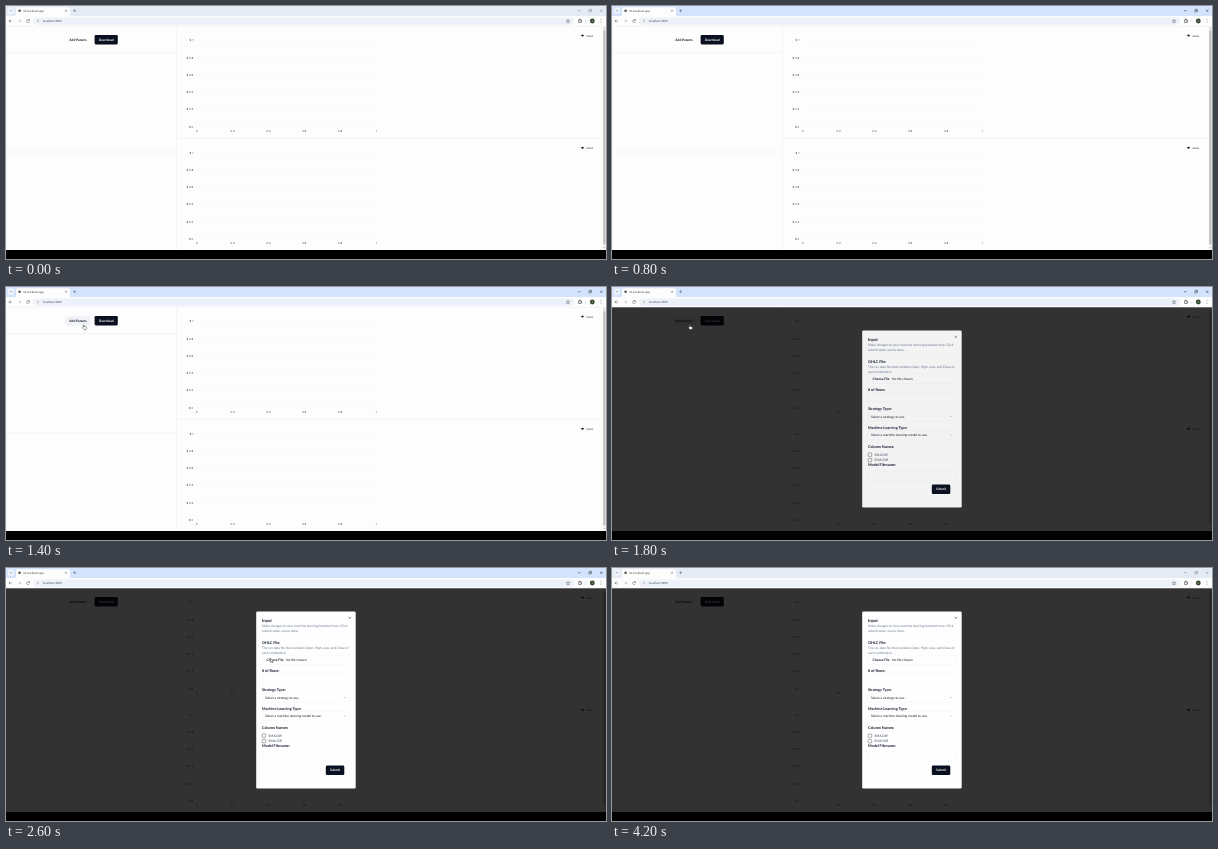
Animation of 600x253 px, one loop 8 s. Source, as an HTML page:

```html
<!DOCTYPE html>
<html lang="en">
<head>
<meta charset="utf-8">
<title>Backtest form</title>
<style>
  html, body { margin: 0; width: 100%; height: 100%; overflow: hidden; background: #000; }
  svg { display: block; width: 600px; height: 253px; }
  text { font-family: Lato, "Open Sans", sans-serif; font-size: 3.28px; fill: #0f172a; text-rendering: geometricPrecision; }
  .bold { font-weight: 700; }
  .label { font-weight: 700; font-size: 3.75px; }
  .muted { fill: #64748b; }
  .chrome { font-family: "Open Sans", sans-serif; font-size: 2.8px; fill: #333; }
  .axis { font-family: Inter, sans-serif; font-size: 2.8px; fill: #444; }
</style>
</head>
<body>
<svg id="stage" viewBox="0 0 600 253"></svg>
<script>
const LOOP = 8000;
const INK = '#0b1020';
const stage = document.getElementById('stage');

const rect = (x, y, w, h, fill, rx = 0, extra = '') =>
  `<rect x="${x}" y="${y}" width="${w}" height="${h}" rx="${rx}" fill="${fill}" ${extra}/>`;
const line = (x1, y1, x2, y2, color, width = 0.5, extra = '') =>
  `<path d="M${x1} ${y1}L${x2} ${y2}" stroke="${color}" stroke-width="${width}" ${extra}/>`;
const stroke = (d, color, width = 0.5) =>
  `<path d="${d}" fill="none" stroke="${color}" stroke-width="${width}"/>`;
const circle = (x, y, r, fill) => `<circle cx="${x}" cy="${y}" r="${r}" fill="${fill}"/>`;
const text = (x, y, value, cls = '', extra = '') =>
  `<text x="${x}" y="${y}" class="${cls}" ${extra}>${value}</text>`;
const middle = 'text-anchor="middle"';
const cross = (x, y, r, color) =>
  stroke(`M${x - r} ${y - r}l${2 * r} ${2 * r}M${x + r} ${y - r}l${-2 * r} ${2 * r}`, color);

function button(x, y, w, h, label) {
  return rect(x, y, w, h, INK, 1.3) +
    text(x + w / 2, y + h / 2 + 1.15, label, 'bold', `${middle} style="fill:#fff"`);
}

function browserBar() {
  const icon = '#555';
  return rect(0, 0, 600, 10, '#d3e3fd', 0, 'id="titlebar"') +
    rect(1.8, 1.5, 6, 6.2, '#eef3fc', 1.5) +
    stroke('M3.9 4.1l1 1l1-1', icon) +
    '<path d="M9 10Q10 10 10 8.5V3Q10 1.2 12 1.2H62Q64 1.2 64 3V8.5Q64 10 65 10Z" fill="#fdfdfd"/>' +
    circle(13.6, 4.7, 1.3, '#555') +
    text(17, 5.7, 'ml-backtest-app', 'chrome') +
    cross(60, 4.7, 0.9, icon) +
    stroke('M67.2 4.7h2.8M68.6 3.3v2.8', icon) +
    '<g id="controls">' +
    line(572, 4.7, 574.4, 4.7, '#222') +
    stroke('M582.8 4h2v2h-2ZM583.5 3.9v-.6h2v2h-.6', '#222', 0.4) +
    cross(595.2, 4.7, 1.1, '#222') + '</g>' +
    rect(0, 10, 600, 10.5, '#fdfdfd') +
    rect(27, 11.4, 541, 7.3, '#edf2fa', 3.6) +
    stroke('M6 15H3M4.4 13.6L3 15l1.4 1.4', icon) +
    stroke('M12 15h3M13.6 13.6L15 15l-1.4 1.4', '#aaa') +
    stroke('M23.3 14.2A1.5 1.5 0 1 0 23.5 15.6M23.5 13.2v1.3h-1.3', icon) +
    circle(32, 15, 2.3, '#fdfdfd') +
    stroke('M30.8 14.2h2.4M30.8 15.8h2.4', icon, 0.4) +
    text(36.8, 16, 'localhost:3000', 'chrome') +
    stroke('M562 13.3l.5 1.2l1.3.1l-1 .9l.3 1.3l-1.1-.7l-1.1.7l.3-1.3l-1-.9l1.3-.1Z', '#444', 0.4) +
    stroke('M572.6 13.8h2.5v2.7h-2.5ZM573.5 13.8v-.6h.8v.6M575.1 14.7h.5v.8h-.5', '#333', 0.55) +
    line(579.7, 13.2, 579.7, 16.8, '#c5d5ee', 0.4) +
    circle(586.3, 15, 2.4, '#33452f') +
    circle(586.3, 15, 0.7, '#9aa894') +
    [13.7, 15, 16.3].map(y => circle(595, y, 0.35, '#333')).join('') +
    line(0, 20.3, 600, 20.3, '#e2e6ec', 0.4);
}

function chart(top) {
  let out = '';
  for (let i = 0; i <= 5; i++) {
    const y = top + i * 17.26;
    const tick = i / 5;
    out += line(190.5, y, 370, y, '#eeeeee', 0.4, 'stroke-dasharray=".7 .5"') +
      text(187.3, y + 1, '$ ' + (5 - i) / 5, 'axis', 'text-anchor="end"') +
      text(190.7 + tick * 179.3, top + 91.7, tick, 'axis', middle);
  }
  return out + line(574.8, top - 4.8, 578.2, top - 4.8, '#111', 0.4) +
    circle(576.5, top - 4.8, 1, '#111') +
    text(580, top - 3.9, 'value', 'axis');
}

function page() {
  const rule = '#e9ebef';
  return rect(0, 20, 600, 224, '#fdfdfd') +
    browserBar() +
    line(170.5, 20.5, 170.5, 244, rule) +
    line(0, 46.7, 170, 46.7, rule) +
    line(0, 146, 170, 146, rule) +
    line(171, 132.2, 597, 132.2, rule) +
    line(0.3, 20.5, 0.3, 244, rule) +
    rect(59.3, 29, 25.4, 9.4, '#f1f3f6', 1.3, 'id="hover"') +
    text(72, 34.85, 'Add Params', 'bold', middle) +
    button(88.6, 29, 23.2, 9.4, 'Download') +
    chart(34.4) + chart(146.5) +
    rect(596.6, 20.5, 3.4, 223.5, '#f3f3f3') +
    rect(597.3, 24, 2.2, 214.5, '#bcbcbc', 1) +
    stroke('M597.6 22.7l.8-.9l.8.9M597.6 241l.8.9l.8-.9', '#777', 0.4);
}

function field(y, value = '', isSelect = false) {
  return rect(256.2, y, 87.4, 9.2, '#fefefe', 1.2, 'stroke="#edf0f4" stroke-width=".35"') +
    text(259, y + 5.7, value) +
    (isSelect ? stroke(`M337.9 ${y + 4.1}l1 1l1-1`, '#888', 0.4) : '');
}

function checkbox(y, label) {
  return rect(256.2, y - 1.8, 3.5, 3.5, '#fefefe', 0.7, 'stroke="#333" stroke-width=".4"') +
    text(262.6, y + 1.1, label, '', 'style="fill:#334155"');
}

function modal() {
  const labels = [
    [76.3, 'OHLC File:'], [104.4, '# of Rows:'], [123.3, 'Strategy Type:'],
    [142, 'Machine Learning Type:'], [160.9, 'Column Names:'], [179.3, 'Model Filename:']
  ];
  const notes = [
    [59, 'Make changes to your machine learning backtest here. Click'],
    [63.5, "submit when you're done."],
    [81.3, 'The csv data file that contains Open, High, Low, and Close of'],
    [86, 'each candlestick.']
  ];
  return rect(250.2, 43.6, 99.5, 176.9, '#fefefe', 1.3) +
    text(256, 53.5, 'Input', 'bold', 'style="font-size:4.2px"') +
    cross(343.8, 49.8, 1, '#444') +
    notes.map(([y, s]) => text(256, y, s, 'muted')).join('') +
    field(87.3) +
    text(260.5, 93.2, 'Choose File', 'bold') +
    text(280, 93.2, 'No file chosen') +
    field(106) +
    field(124.8, 'Select a strategy to use.', true) +
    field(143.5, 'Select a machine learning model to use.', true) +
    checkbox(167.7, 'SMA Diff') + checkbox(173.2, 'EMA Diff') +
    field(184.2) +
    labels.map(([y, s]) => text(256, y, s, 'label')).join('') +
    button(319.8, 197.6, 18.5, 9.4, 'Submit');
}

stage.innerHTML = page() +
  '<g id="dialog">' + rect(0, 20.3, 600, 223.7, '#000', 0, 'fill-opacity=".8"') +
  '<g id="panel">' + modal() + '</g></g>' +
  rect(0, 244, 600, 9, '#000') +
  '<path id="arrow" d="M0 0V4.2L1 3.3L1.7 4.8L2.4 4.5L1.7 3.1H3Z" fill="#fff" stroke="#111" stroke-width=".4"/>' +
  '<path id="hand" d="M1.2 2.8V.6Q1.6 0 2 .6V2L4 2.5Q4.5 2.7 4.3 3.5L3.8 5.2H1.7L.2 3.3Q.2 2.6 1.2 2.8Z" fill="#fff" stroke="#111" stroke-width=".4"/>';

const part = Object.fromEntries([...stage.querySelectorAll('[id]')].map(el => [el.id, el]));
const show = (el, on) => el.setAttribute('visibility', on ? 'visible' : 'hidden');

// Pointer steps: start time, shape, x, y.
const pointer = [
  [0, null, 0, 0],
  [1000, 'arrow', 77.3, 65.2],
  [1200, 'arrow', 77.3, 42.2],
  [1400, 'hand', 76.2, 37.4],
  [2000, 'arrow', 105.3, 42.2],
  [2200, 'arrow', 248.4, 86],
  [2400, 'arrow', 262.4, 89.2],
  [2600, 'arrow', 264.4, 90],
  [2800, null, 0, 0]
];

function render(t) {
  const active = t >= 800 && t < 2800;
  part.titlebar.setAttribute('fill', active ? '#d3e3fd' : '#e5ebf4');
  part.controls.setAttribute('opacity', active ? 1 : 0.55);
  show(part.hover, t >= 1400 && t < 2000);
  show(part.dialog, t >= 1800);
  part.panel.setAttribute('opacity', t < 2000 ? 0.95 : 1);
  const [, shape, x, y] = pointer.findLast(step => step[0] <= t);
  for (const name of ['arrow', 'hand']) {
    show(part[name], name === shape);
    part[name].setAttribute('transform', `translate(${x} ${y})`);
  }
}

function tick() {
  render(performance.now() % LOOP);
  requestAnimationFrame(tick);
}
tick();
</script>
</body>
</html>
```
